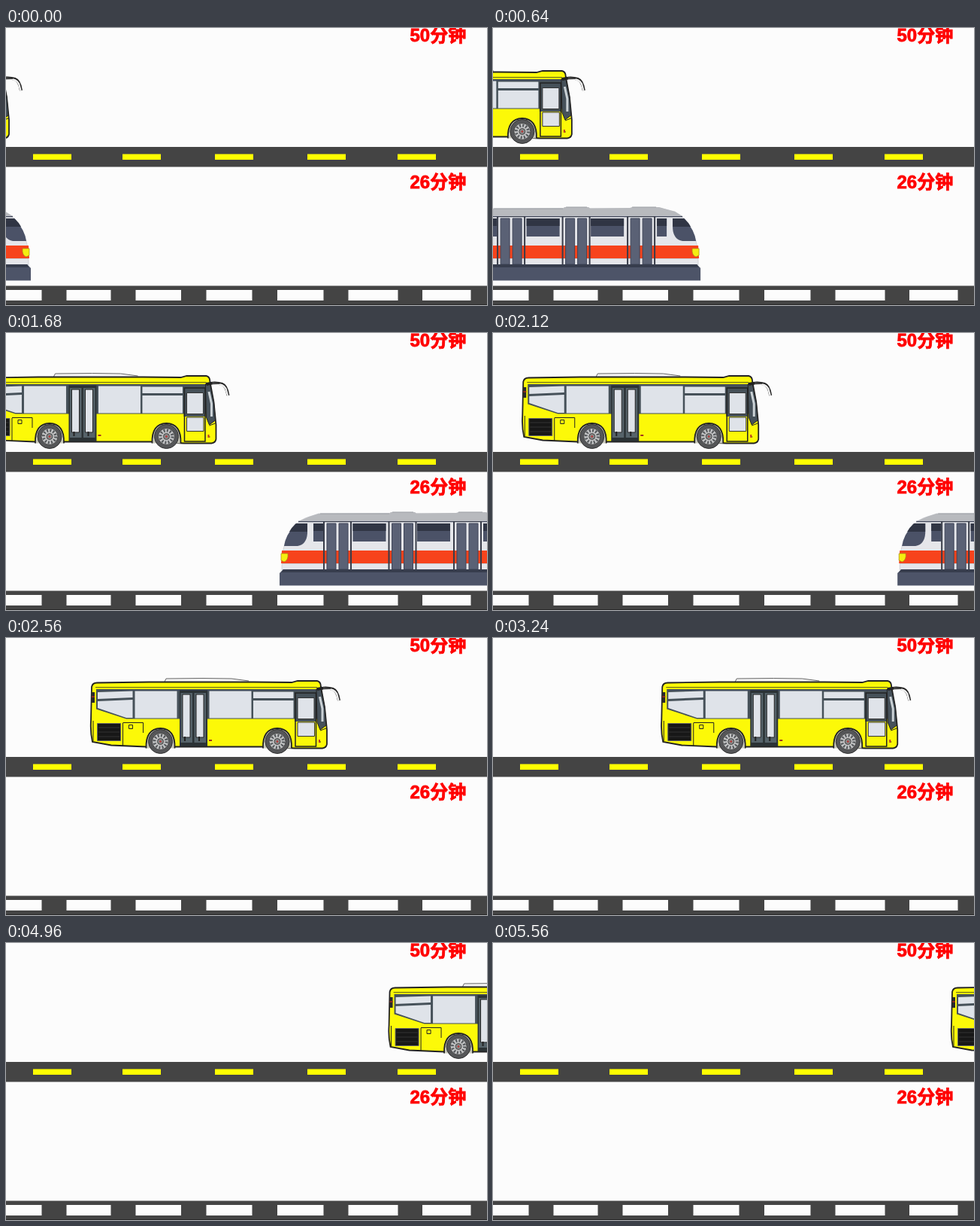
These frames come from a looping animation (640 px wide and 368 px high, 5600 ms). An HTML page:

```html
<!DOCTYPE html>
<html lang="zh">
<head>
<meta charset="utf-8">
<style>
html, body { margin: 0; width: 100%; height: 100%; overflow: hidden; background: #fcfcfc; }
svg { display: block; width: 640px; height: 368px; }
text { font: bold 24px "Liberation Sans", "Noto Sans CJK SC", "Noto Sans CJK", sans-serif; fill: #f00; stroke: #f00; stroke-width: .8; }
.glass { fill: #dfe3e9; }
.frame { fill: #465159; }
.pane { fill: #4b5267; }
.shade { fill: #303544; }
.line { fill: none; stroke: #222; }
</style>
</head>
<body>
<svg viewBox="0 0 640 368">
  <defs>
    <g id="wheel">
      <path d="M-19 9Q-20-17 0-17.500Q20-17 19 9" fill="#c9c9bc" stroke="#222" stroke-width="1.800"/>
      <circle r="16" fill="#555658" stroke="#333"/>
      <circle r="11" fill="#c3c4c5" stroke="#444"/>
      <circle r="8" fill="none" stroke="#55585b" stroke-width="4" stroke-dasharray="2 2.200"/>
      <circle r="4" fill="#888" stroke="#444"/>
      <circle r="1.300" fill="#b33"/>
    </g>
    <g id="nose">
      <path class="pane" d="M466 253H481Q495 268 497 283H479Q467 281 466 266Z"/>
      <path class="shade" d="M466 253H481Q487 258 490 264H466Z"/>
      <path d="M501 293H492Q491 302 497 304L501 302Z" fill="#f5ee10" stroke="#a98b12" stroke-width=".7"/>
      <path class="pane" d="M445 253h13v24h-13z"/>
      <path class="shade" d="M445 253h13v10h-13z"/>
    </g>
    <g id="door">
      <path d="M-2 250V314M34 250V314" stroke="#383c49" stroke-width="2"/>
      <path d="M-2 250.500H34" stroke="#383c49"/>
      <path d="M2 253h12v61h-12zM18 253h12v61h-12z" fill="#5a6175" stroke="#41475a"/>
    </g>
    <g id="window">
      <path class="pane" d="M0 253h44v24h-44z"/>
      <path class="shade" d="M0 253h44v10h-44z"/>
    </g>
  </defs>

  <path d="M0 158H640V184.500H0zM0 342.500H640V368H0z" fill="#444"/>
  <path d="M0 367.500H640" stroke="#292929"/>
  <g id="dashes"></g>
  <text x="537.500" y="17.500">50分钟</text>
  <text x="537.500" y="212.500">26分钟</text>

  <g id="bus">
    <path d="M211 58L213 54L262 53.500L300 54L323 57" fill="#f4f4f4" stroke="#666"/>
    <path d="M114 65Q115 59.500 121 59.500L190 58.500L330 58.500L380 59L388 57L414 57Q419 58 419 65L424 92L427 122V141Q426 146 421 146.500H384L345 144.500H225L186 144.500L140 142.500L115 138Q112 125 113 110Z" fill="#fcf908" stroke="#222" stroke-width="1.800"/>
    <path d="M119 65.500H414" class="line" stroke="#77750c" stroke-width=".7"/>
    <path class="frame" d="M120 68H414V107.500H160L120 94.500Z"/>
    <path class="glass" d="M122 72L168.500 70.500V79L122 81zM122 84L168.500 82V106H160L122 93zM171.500 70.500h56v36h-56zM270.500 70.500h56v36h-56zM329 71.500h53.500v8.500h-53.500zM329 83h53.500v23.500h-53.500z"/>
    <path d="M231 69.500h37v74.500h-37z" fill="#2b3235"/>
    <path d="M232.500 73h15.500v66h-15.500zM250.500 73h15.500v66h-15.500z" fill="#56636a"/>
    <path class="glass" d="M235 75h10v57h-10zM253 75h10v57h-10z" stroke="#222"/>
    <path d="M238 131v6M257 131v6" stroke="#222" stroke-width="2"/>
    <path class="frame" d="M384 69H413V111H384z"/>
    <path d="M385 73h27.500v71h-27.500z" class="line" stroke-width="1.500"/>
    <path class="glass" d="M388 79.500h22v28h-22zM388 112h22.500v18.500h-22.500z" stroke="#333"/>
    <path d="M413 68H419L424 92L426 116L418 122L414 112Z" fill="#46515a" stroke="#222"/>
    <path d="M417.500 78L421 94V111" fill="none" stroke="#cbd2d6" stroke-width="3"/>
    <path d="M418 123l8-3M417 138h2" class="line"/>
    <path d="M416 135h2v4h-2z" fill="#c43c1c"/>
    <path d="M414 68Q426 65 435 68Q441 70 443 83" class="line" stroke="#777" stroke-width="4"/>
    <path d="M422 67.500Q437 67 440 74L442.500 83" fill="none" stroke="#eee" stroke-width="2.400"/>
    <path d="M413 67.500L432 67" class="line" stroke-width="1.500"/>
    <path d="M114 72h4v14h-4z" fill="#292929"/>
    <path d="M114 77h4v2h-4z" fill="#8b2c20"/>
    <path d="M121.500 113.500h31v23h-31z" fill="#171717" stroke="#666"/>
    <path d="M123 119h28M123 125h28M123 131h28" stroke="#333"/>
    <path d="M155.500 112.500H182.500V126M155.500 113V143" class="line" stroke="#77750c"/>
    <path d="M163.500 115.500h5v5h-5zM116 110V137" class="line" stroke="#55540a"/>
    <path d="M270 136h4" stroke="#a3351d" stroke-width="2"/>
    <use href="#wheel" x="205.500" y="137.500"/>
    <use href="#wheel" x="361" y="137.500"/>
  </g>

  <g id="tram">
    <path d="M177 315Q176 286 186 267Q194 252 208 246L226 240H452L469 244Q484 252 491 267Q501 286 500 315Z" fill="#e5e6ea" stroke="#c5c7cd" stroke-width=".7"/>
    <path d="M202 249Q214 243 226 240L320 239.500L322 238H354L356 239.500L409 239L412 238H448L469 244L477 249Z" fill="#b8babe"/>
    <path d="M228 240H320M324 238H352M412 238H444" stroke="#9b9ea4"/>
    <path d="M199 250.500H479" stroke="#42475a" stroke-width="1.300"/>
    <path d="M177 289H500L501 306H176Z" fill="#f7431c"/>
    <path d="M177 306.500H500" stroke="#c9cad1"/>
    <use href="#nose"/>
    <use href="#nose" transform="matrix(-1 0 0 1 677 0)"/>
    <use href="#window" x="271.500"/>
    <use href="#window" x="357"/>
    <use href="#door" x="235"/>
    <use href="#door" x="321.500"/>
    <use href="#door" x="408"/>
    <path d="M179 314H498L503 319V335.500H174V319Z" fill="#4d5468"/>
    <path d="M179 314H498L501 318H176Z" fill="#373d4d"/>
  </g>
</svg>
<script>
const $ = id => document.getElementById(id);

const dash = (x, y, w, h, fill) =>
  `<rect x="${x}" y="${y}" width="${w}" height="${h}" fill="${fill}"/>`;
const yellow = [36, 155, 278, 401, 521].map(x => dash(x, 167.5, 51, 7.5, '#ff0'));
const white = [[0, 47.5], [80.5, 59], [172.5, 60.5], [266.5, 61], [361, 61.5], [455.5, 66], [554, 64.5]]
  .map(([x, w]) => dash(x, 348, w, 14, '#fcfcfc'));
$('dashes').innerHTML = yellow.concat(white).join('');

// Travel as [step, offset] points, straight between them
const busPath = [[0, -423], [29, -228], [63, 0], [97, 222.5], [138, 497]];
const tramPath = [[0, -470], [29, 0], [41, 190], [138, 1726]];

function along(path, k) {
  const i = path.findIndex(p => p[0] >= k) || 1;
  const [k0, x0] = path[i - 1], [k1, x1] = path[i];
  return x0 + (x1 - x0) * (k - k0) / (k1 - k0);
}

function draw(now) {
  const step = Math.max(0, Math.floor(now % 5600 / 40) - 1);
  $('bus').setAttribute('transform', `translate(${along(busPath, step)})`);
  $('tram').setAttribute('transform', `translate(${along(tramPath, step)})`);
}

const start = performance.now();
function tick() {
  draw(performance.now() - start);
  requestAnimationFrame(tick);
}
tick();
</script>
</body>
</html>
```
